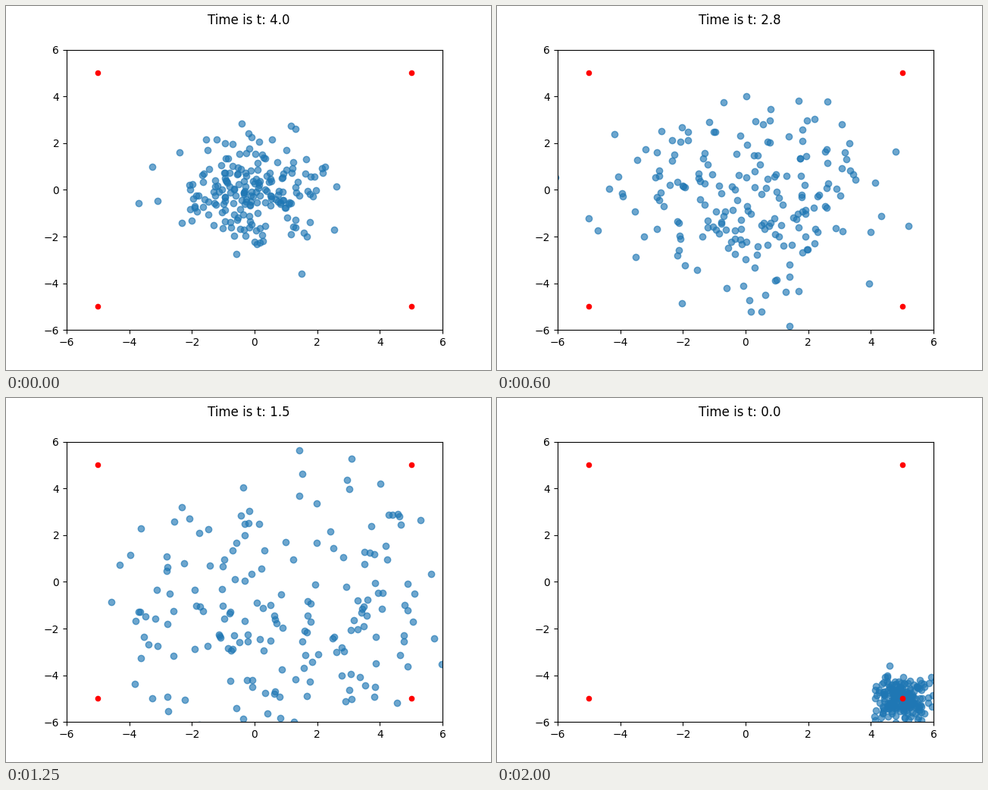
A matplotlib script that plays this animation: 640x480 px, repeating every 2050 ms.

```python
import matplotlib.pyplot as plt
import numpy as np
from matplotlib.animation import FuncAnimation

FRAMES = 41
COUNT = 200
CORNER = np.array([5, -5])
STEP_NOISE = 0.3


def smoothstep(u, start, end):
    s = np.clip((u - start) / (end - start), 0, 1)
    return s * s * (3 - 2 * s)


def split(u):
    """Distance of the modes from the centre: grows, then collapses."""
    return (0.6 + 3.2 * u) * (1 - smoothstep(u, 0.6, 0.88))


def spread(u):
    """Width of the noise: swells, then tightens at the very end."""
    return 1 + 0.7 * np.sin(np.pi * u) - 0.55 * u**10


def simulate(seed=4):
    """Noisy particles that split apart, then gather in one corner."""
    rng = np.random.default_rng(seed)
    modes = 1.25 * np.cos(rng.uniform(0, np.pi, (COUNT, 2)))
    noise = rng.standard_normal((COUNT, 2))
    path = []
    for u in np.linspace(0, 1, FRAMES):
        path.append(CORNER * u**3 + split(u) * modes + spread(u) * noise)
        mix = STEP_NOISE / spread(u)
        noise = np.sqrt(1 - mix**2) * noise + mix * rng.standard_normal((COUNT, 2))
    return path


path = simulate()

fig, ax = plt.subplots(figsize=(6.4, 4.8), dpi=100)
ax.set(xlim=(-6, 6), ylim=(-6, 6))
cloud = ax.scatter(*path[0].T, color="tab:blue", alpha=0.65, lw=1)
ax.scatter([-5, -5, 5, 5], [-5, 5, -5, 5], s=20, color="red", lw=1, zorder=2)
title = fig.suptitle("")


def update(k):
    cloud.set_offsets(path[k])
    title.set_text(f"Time is t: {(FRAMES - 1 - k) / 10:.1f}")
    return cloud, title


anim = FuncAnimation(fig, update, frames=FRAMES, interval=50, repeat=True, repeat_delay=0)
plt.show()
```
